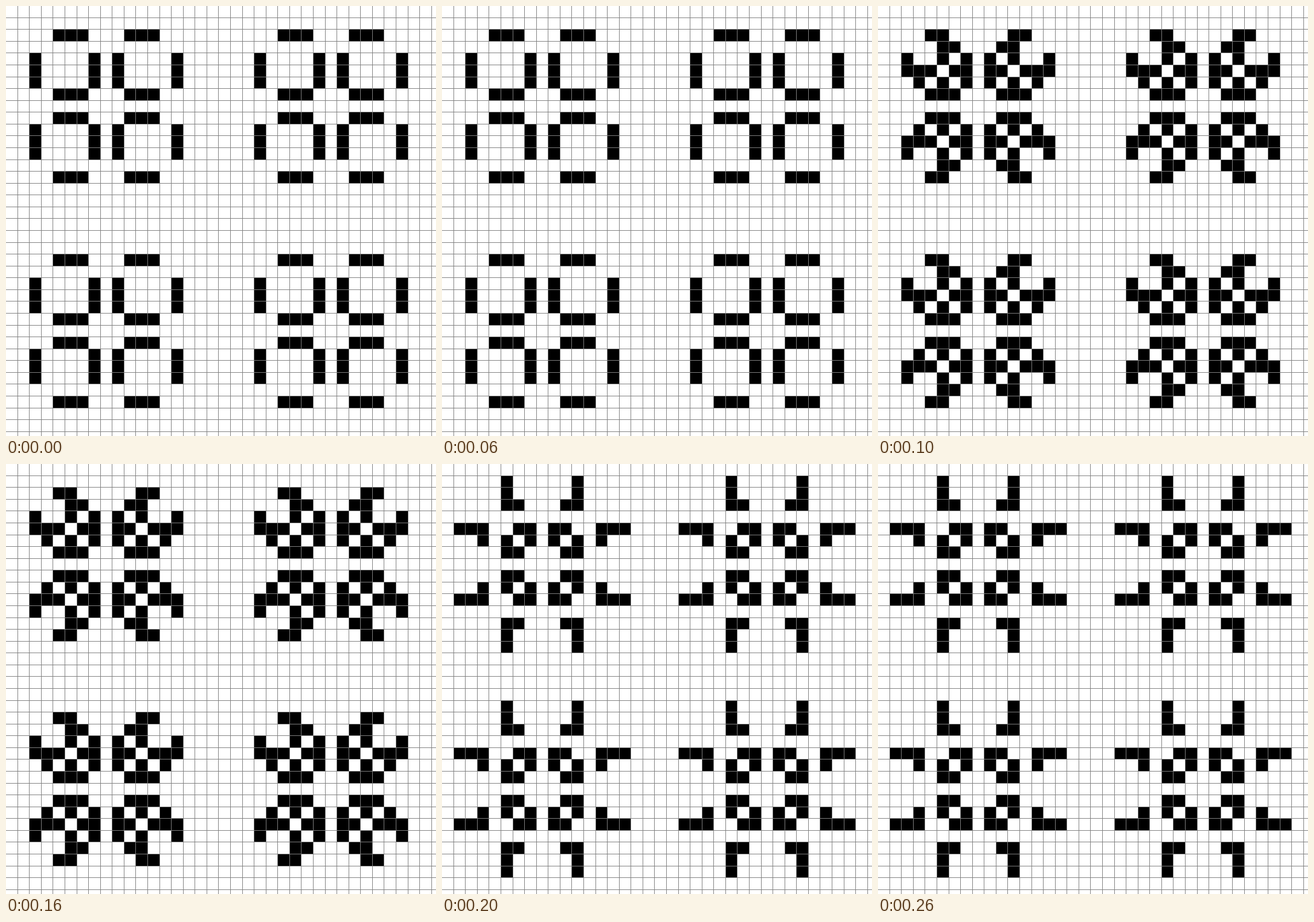
Animation of 748x748 px, one loop 0.3 s. Source, as an HTML page with a canvas:

```html
<!DOCTYPE html>
<html lang="en">
<head>
<meta charset="utf-8">
<title>Four pulsars</title>
<style>
  html, body { margin: 0; width: 100%; height: 100%; overflow: hidden; background: #fff; }
  canvas { display: block; width: 748px; height: 748px; }
</style>
</head>
<body>
<canvas id="board" width="748" height="748"></canvas>
<script>
const SIZE = 748, CELLS = 37, PITCH = 20.57, STEP = 100;
const ctx = document.getElementById('board').getContext('2d');

// Pixel of the grid line before cell k
const line = k => k ? Math.floor(PITCH * k - 0.3) : -1;

// Bars of three cells, mirrored in both axes, repeated every 19 cells
function pulsars() {
  const rail = n => [2, 7, 9, 14].includes(n % 19);
  const bar = n => [4, 5, 6, 10, 11, 12].includes(n % 19);
  return (x, y) => x >= 0 && y >= 0 && x < CELLS && y < CELLS &&
    ((rail(x) && bar(y)) || (bar(x) && rail(y)));
}

// One generation of Conway's Life
function evolve(alive) {
  const next = new Set();
  for (let y = 0; y < CELLS; y++) {
    for (let x = 0; x < CELLS; x++) {
      let n = 0;
      for (let dy = -1; dy <= 1; dy++) {
        for (let dx = -1; dx <= 1; dx++) {
          if ((dx || dy) && alive(x + dx, y + dy)) n++;
        }
      }
      if (n === 3 || (n === 2 && alive(x, y))) next.add(y * CELLS + x);
    }
  }
  return (x, y) => x >= 0 && x < CELLS && next.has(y * CELLS + x);
}

function draw(alive) {
  ctx.fillStyle = '#fff';
  ctx.fillRect(0, 0, SIZE, SIZE);
  ctx.fillStyle = '#000';
  for (let y = 0; y < CELLS; y++) {
    for (let x = 0; x < CELLS; x++) {
      if (!alive(x, y)) continue;
      const left = line(x) + 1, top = line(y) + 1;
      ctx.fillRect(left, top, line(x + 1) - left, line(y + 1) - top);
    }
  }
  ctx.fillStyle = '#808080';
  for (let k = 1; k < CELLS; k++) {
    ctx.fillRect(line(k), 0, 1, SIZE);
    ctx.fillRect(0, line(k), SIZE, 1);
  }
}

// The oscillator plays backwards through its three phases
const first = pulsars();
const second = evolve(first);
const phases = [first, evolve(second), second];
const start = performance.now();
let shown = -1;

function tick() {
  const phase = Math.floor((performance.now() - start) / STEP) % phases.length;
  if (phase !== shown) draw(phases[shown = phase]);
  requestAnimationFrame(tick);
}
tick();
</script>
</body>
</html>
```
